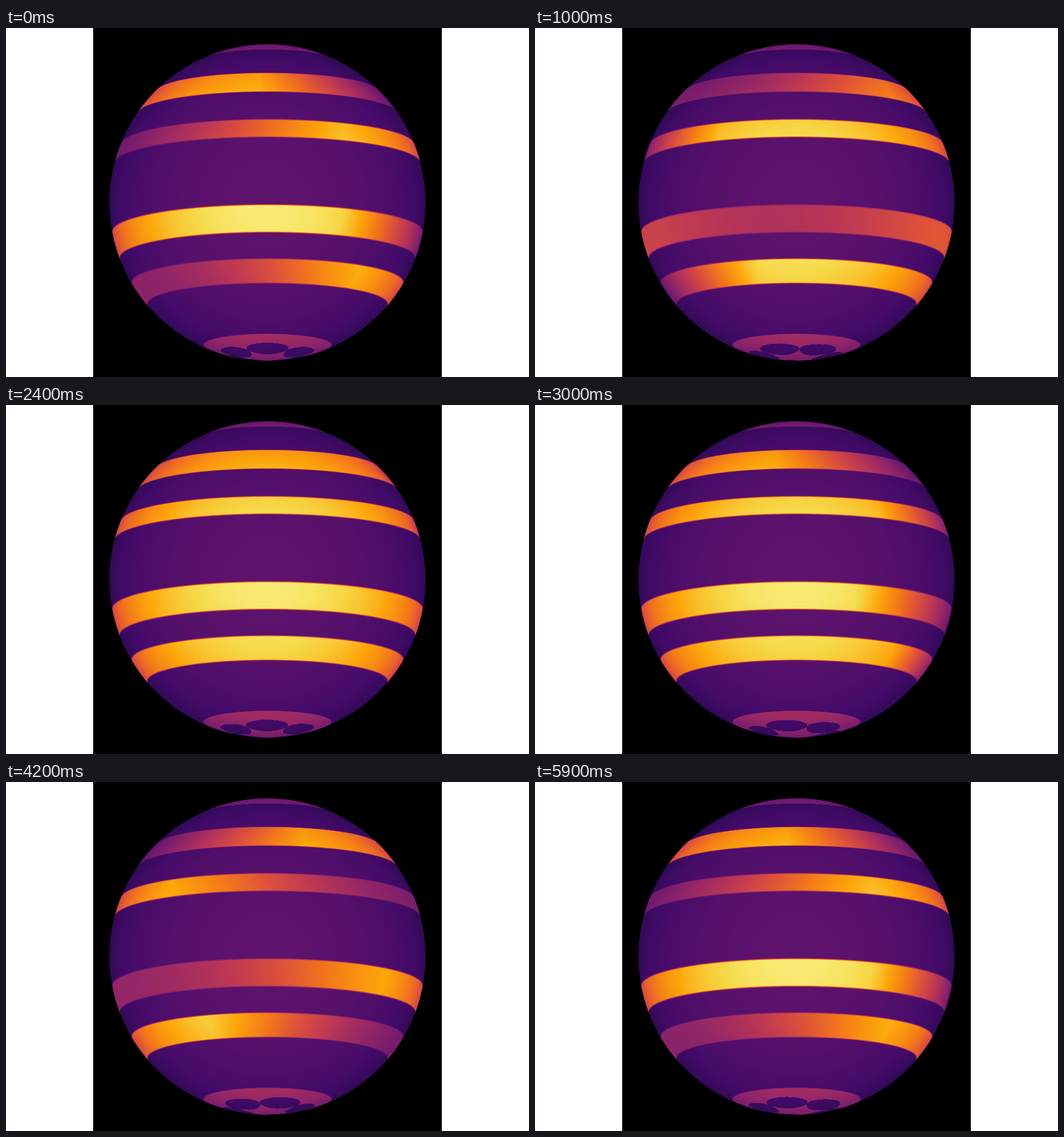
These frames come from a looping animation (900 by 600 pixels, 6000 ms). An HTML page with a canvas:

```html
<!DOCTYPE html>
<html lang="en">
<head>
<meta charset="utf-8">
<title>Banded sphere</title>
<style>
  html, body { margin: 0; width: 100%; height: 100%; overflow: hidden; background: #fff; }
  canvas { display: block; }
</style>
</head>
<body>
<canvas id="stage" width="900" height="600"></canvas>
<script>
const SIZE = 600, LEFT = 150, RADIUS = 272;
const STEPS = 60, STEP_MS = 100;
const RAD = Math.PI / 180, TILT = 10 * RAD;
const DARK = 0.27, PEAK = 0.95;

// Latitudes in degrees, longitude of the dimmest point at the start, turns per loop
const BANDS = [
  { south: 34.5, north: 45, start: 83, turns: 2 },
  { south: 14.5, north: 21.7, start: -57, turns: 1 },
  { south: -20.8, north: -10.8, start: 116, turns: 2 },
  { south: -40.6, north: -30.8, start: -43, turns: 1 }
];
const NORTH_CAP = 65.3, SOUTH_CAP = -66.1;
const SPOTS = { lat: -78, count: 5, halfLon: 36, halfLat: 5.6 };

const STOPS = ['000004', '160b39', '420a68', '6a176e', '932667', 'bc3754',
               'dd513a', 'f37819', 'fca50a', 'f6d746', 'fcffa4']
  .map(hex => [0, 2, 4].map(i => parseInt(hex.slice(i, i + 2), 16)));

const PALETTE = Array.from({ length: 1024 }, (_, i) => {
  const p = i / 1023 * (STOPS.length - 1);
  const k = Math.min(Math.floor(p), STOPS.length - 2);
  return STOPS[k].map((c, j) => c + (STOPS[k + 1][j] - c) * (p - k));
});

const clamp = v => Math.max(0, Math.min(1, v));
const edge = d => clamp(0.5 + d / 0.6);
const mix = (a, b, w) => a + (b - a) * w;

const ctx = document.getElementById('stage').getContext('2d');
const image = ctx.createImageData(SIZE, SIZE);
for (let i = 3; i < image.data.length; i += 4) image.data[i] = 255;

function surfacePoint(col, row) {
  let x = (col + 0.5 - SIZE / 2) / RADIUS;
  let up = (SIZE / 2 - row - 0.5) / RADIUS;
  const r = Math.hypot(x, up);
  const cover = clamp((1 - r) * RADIUS + 0.5);
  if (!cover) return null;
  if (r > 1) { x /= r; up /= r; }
  const z = Math.sqrt(Math.max(0, 1 - x * x - up * up));
  const lat = Math.asin(up * Math.cos(TILT) - z * Math.sin(TILT)) / RAD;
  const lon = Math.atan2(x, up * Math.sin(TILT) + z * Math.cos(TILT)) / RAD;
  const point = { at: (row * SIZE + col) * 4, lat, lon, cover,
                  light: 1 - 0.45 * (1 - z), band: -1, weight: 0 };
  BANDS.forEach((b, i) => {
    const w = edge(Math.min(lat - b.south, b.north - lat));
    if (w) { point.band = i; point.weight = w; }
  });
  return point;
}

const points = [];
for (let row = 0; row < SIZE; row++) {
  for (let col = 0; col < SIZE; col++) {
    const p = surfacePoint(col, row);
    if (p) points.push(p);
  }
}

function inSpot(p, spin) {
  const gap = 360 / SPOTS.count;
  const d = p.lon - spin;
  const dLon = d - gap * Math.round(d / gap);
  return Math.hypot(dLon / SPOTS.halfLon, (p.lat - SPOTS.lat) / SPOTS.halfLat) < 1;
}

function brightness(p, dimmest, spin) {
  if (p.band >= 0) {
    const wave = 0.976 - 0.5 * Math.cos((p.lon - dimmest[p.band]) * RAD);
    return mix(DARK, Math.min(PEAK, wave), p.weight);
  }
  if (p.lat > 60) return mix(DARK, 0.5, edge(p.lat - NORTH_CAP));
  if (p.lat < -60) return inSpot(p, spin) ? DARK : mix(DARK, 0.55, edge(SOUTH_CAP - p.lat));
  return DARK;
}

function draw(step) {
  const phase = step / (STEPS - 1);
  const dimmest = BANDS.map(b => b.start - 360 * b.turns * phase);
  const spin = -161 * phase - 8 * Math.sin(Math.PI * phase);
  const data = image.data;
  for (const p of points) {
    const rgb = PALETTE[Math.round(clamp(brightness(p, dimmest, spin) * p.light) * 1023)];
    for (let j = 0; j < 3; j++) data[p.at + j] = rgb[j] * p.cover;
  }
  ctx.putImageData(image, LEFT, 0);
}

let shown = -1;
function tick() {
  const step = Math.floor(performance.now() / STEP_MS) % STEPS;
  if (step !== shown) draw(shown = step);
  requestAnimationFrame(tick);
}
ctx.fillStyle = '#fff';
ctx.fillRect(0, 0, 900, 600);
tick();
</script>
</body>
</html>
```
